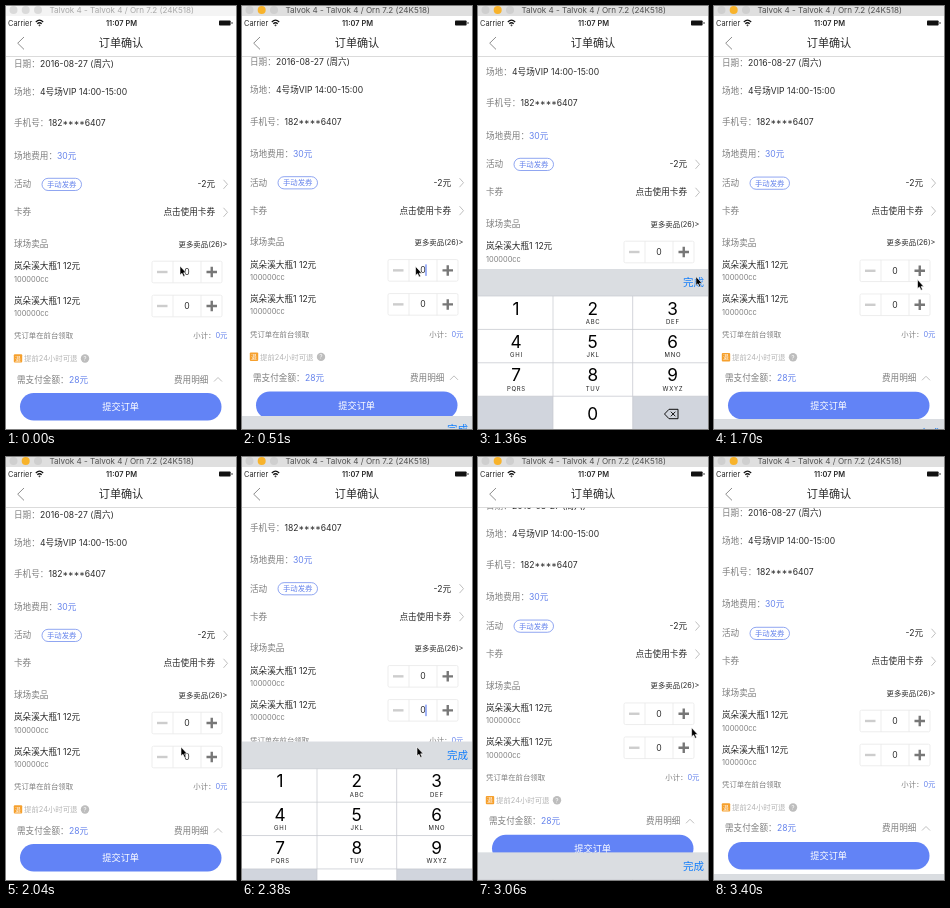
An HTML page for the animation above (3.57 s loop, 230 px wide and 423 px high).

```html
<!DOCTYPE html>
<html lang="zh">
<head>
<meta charset="utf-8">
<title>订单确认</title>
<style>
  html, body { margin: 0; width: 100%; height: 100%; overflow: hidden; background: #fff; }
  svg { display: block; font: 8.6px Inter, "Noto Sans CJK SC", "Noto Sans CJK", sans-serif; }
  text { fill: #2a2a2a; white-space: pre; }
  .label { fill: #7e7e7e; }
  .small { font-size: 7.4px; }
  .blue { fill: #6583ec; }
  .mid { text-anchor: middle; }
  .end { text-anchor: end; }
  .line { fill: none; stroke: #b8b8b8; stroke-width: .9; }
  .edge { stroke: #e9e9e9; stroke-width: .8; }
  #bar { fill: #f4f4f4; }
  #bar text { font-size: 8.1px; fill: #a8a8a8; }
  #bar circle { fill: #dadada; }
  #bar.active { fill: #dfdfdf; }
  #bar.active text { fill: #505050; }
  #bar.active circle { fill: #cfcfcf; }
  #bar.active .amber { fill: #f8b32b; }
  #keys .digit { font-size: 17.2px; fill: #000; }
  #keys .letters { font-size: 6px; letter-spacing: .7px; fill: #222; }
</style>
</head>
<body>
<svg width="230" height="423" viewBox="0 0 230 423">
  <defs>
    <path id="next" class="line" d="M217.5 -4.5l4 4.5-4 4.5"/>
    <g id="stepper">
      <rect class="edge" x="146" y="-10.8" width="70" height="21.6" rx="1.5" fill="#fff"/>
      <path class="edge" d="M167 -10.8v21.6M195 -10.8v21.6"/>
      <path d="M151 0h10.5" stroke="#cdcdcd" stroke-width="2.4"/>
      <path d="M200.5 0h10.5M205.75 -5.25v10.5" stroke="#777" stroke-width="2.4"/>
      <text class="mid" x="181" y="3.1">0</text>
    </g>
  </defs>
  <rect width="230" height="423" fill="#fff"/>

  <g id="page">
    <text class="label" x="8" y="61.1">日期：</text><text x="34" y="61.1">2016-08-27 (周六)</text>
    <text class="label" x="8" y="89.1">场地：</text><text x="34" y="89.1">4号场VIP 14:00-15:00</text>
    <text class="label" x="8" y="120.3">手机号：</text><text x="42.5" y="120.3">182****6407</text>
    <text class="label" x="8" y="152.5">场地费用：</text><text class="blue" x="51" y="152.5">30元</text>

    <text class="label" x="8" y="181.3">活动</text>
    <rect x="36" y="172.3" width="39.5" height="12.2" rx="6.1" fill="none" stroke="#7490ee" stroke-width=".8"/>
    <text class="small blue mid" x="55.7" y="181.1">手动发券</text>
    <text class="end" x="209" y="181.3">-2元</text><use href="#next" y="178.3"/>

    <text class="label" x="8" y="209.3">卡券</text>
    <text class="end" x="209" y="209.3">点击使用卡券</text><use href="#next" y="206.3"/>

    <text class="label" x="8" y="241">球场卖品</text>
    <text class="small end" x="221.5" y="240.6">更多卖品(26)&gt;</text>

    <text x="8" y="263.3">岚朵溪大瓶1 12元</text><text class="small label" x="8" y="275.7">100000cc</text>
    <use href="#stepper" y="266"/>
    <text x="8" y="297.7">岚朵溪大瓶1 12元</text><text class="small label" x="8" y="310.1">100000cc</text>
    <use href="#stepper" y="300"/>
    <rect id="caret" x="183.5" width="1" height="11.5" fill="#4468ee"/>

    <text class="small label" x="8" y="332.2">凭订单在前台领取</text>
    <text class="small label end" x="221.5" y="332.2">小计：<tspan class="blue">0元</tspan></text>

    <rect x="7.8" y="348.2" width="8.4" height="8.4" rx="1" fill="#f6a02d"/>
    <text class="mid" x="12" y="354.6" style="font-size:5.8px;fill:#fff">退</text>
    <text class="small" x="18" y="355.2" style="fill:#b4b4b4">提前24小时可退</text>
    <circle cx="79" cy="352.5" r="4.2" fill="#bdbdbd"/>
    <text class="mid" x="79" y="354.9" style="font-size:6.5px;fill:#fff">?</text>

    <text class="label" x="11" y="376.5">需支付金额：</text><text class="blue" x="63" y="376.5">28元</text>
    <text class="label" x="168" y="376.5">费用明细</text>
    <path class="line" d="M208 375.5l4-4 4 4"/>
    <rect x="14" y="387" width="201.5" height="27.6" rx="13.8" fill="#6283f6"/>
    <text class="mid" x="114.7" y="404.2" style="font-size:9.2px;fill:#fff">提交订单</text>
  </g>

  <rect y="10" width="230" height="40.5" fill="#fff"/>
  <path d="M0 50.5h230" stroke="#d2d2d2" stroke-width=".8"/>
  <text class="small" x="2" y="19.7">Carrier</text>
  <g fill="none" stroke="#111" stroke-width="1.2">
    <path d="M29.8 16q3.7-3.6 7.4 0M31.3 17.8q2.2-2.1 4.4 0"/>
    <circle cx="33.5" cy="19.3" r=".3"/>
  </g>
  <text class="small mid" x="115.5" y="19.7" font-weight="600">11:07 PM</text>
  <rect x="213" y="14.4" width="11.6" height="5.2" rx=".8" fill="#111"/>
  <path d="M226 16.2v1.6" stroke="#111"/>
  <path class="line" style="stroke:#808080" d="M18 31l-6.3 6.2 6.3 6.2"/>
  <text class="mid" x="115" y="41.1" style="font-size:11.1px">订单确认</text>

  <g id="bar">
    <rect width="230" height="10"/>
    <circle cx="7.5" cy="4" r="4"/><circle class="amber" cx="19.7" cy="4" r="4"/><circle cx="32" cy="4" r="4"/>
    <text class="mid" x="115.7" y="7.2">Talvok 4 - Talvok 4 / Orn 7.2 (24K518)</text>
  </g>

  <g id="keys">
    <rect y="263" width="230" height="160" fill="#d1d5dd"/>
    <rect y="263" width="230" height="27" fill="#dadde1"/>
    <text class="end" x="226" y="280.4" style="font-size:10.5px;font-weight:500;fill:#117dfb">完成</text>
  </g>

  <path id="arrow" d="M0 0v9l2-1.7 1.5 3.3 1.5-.7-1.4-3.1H6.2z" fill="#000" stroke="#fff" stroke-width=".6"/>
</svg>
<script>
  const LOOP = 3570, STEP = 170, RATE = 1.9 / STEP;
  const el = id => document.getElementById(id);
  const [page, keys, bar, caret, arrow] = ['page', 'keys', 'bar', 'caret', 'arrow'].map(el);

  // Keypad
  const letters = ['', 'ABC', 'DEF', 'GHI', 'JKL', 'MNO', 'PQRS', 'TUV', 'WXYZ'];
  const edges = [0, 75, 154.7, 230], centers = [38, 114.7, 194.5];
  const padTop = 290, rowH = 33.4;
  const label = (cls, x, y, s) => `<text class="mid ${cls}" x="${x}" y="${y}">${s}</text>`;
  const cell = (col, row) => `<rect x="${edges[col]}" y="${padTop + row * rowH}"
    width="${edges[col + 1] - edges[col]}" height="${rowH}" fill="#fff"/>`;
  let pad = '';
  letters.forEach((s, i) => {
    const col = i % 3, row = Math.floor(i / 3), y = padTop + row * rowH;
    pad += cell(col, row) + label('digit', centers[col], y + 18.6, i + 1)
      + label('letters', centers[col] + .4, y + 27.8, s);
  });
  pad += cell(1, 3) + label('digit', centers[1], 414.2, 0);
  let grid = edges.slice(1, 3).map(x => `M${x} ${padTop}v133`).join('');
  for (let r = 0; r < 4; r++) grid += `M0 ${padTop + r * rowH}h230`;
  pad += `<path d="${grid}" stroke="#c6c9ce" stroke-width=".7"/>
    <path d="M186.5 408l4.5-4.7h9v9.4h-9zM192.8 405.7l4.6 4.6m0-4.6l-4.6 4.6"
      fill="none" stroke="#111" stroke-width="1"/>`;
  keys.insertAdjacentHTML('beforeend', pad);

  // Keyboard moves: start time, spring phase at start, direction, page lift
  const moves = [
    { at: 0, phase: 9, up: false, lift: 0 },
    { at: 510, phase: .47, up: true, lift: 20 },
    { at: 1530, phase: 2.6, up: false, lift: 20 },
    { at: 2210, phase: 1.6, up: true, lift: 54 },
    { at: 3060, phase: 3.2, up: false, lift: 54, until: 3230 }
  ];
  // Pointer stops: time, x, y
  const pointer = [
    [0, 174, 260], [170, 173.6, 260.4], [850, 176, 261], [1020, 199, 267],
    [1190, 216.2, 269.5], [1360, 217.9, 270.5], [1700, 203.5, 273.6], [1870, 186, 286],
    [2040, 175, 290], [2550, 186, 285], [2720, 213.6, 270.7], [3230, -20, 0]
  ];
  // Visible caret: from, to, y
  const carets = [[510, 1190, 260], [2210, 2890, 294.3]];

  const latest = (list, test) => list.filter(test).pop();
  const spring = u => u > 7.8 ? 1 : 1 - (1 + u) * Math.exp(-u);
  const shift = (node, x, y) => node.setAttribute('transform', `translate(${x} ${y})`);

  function draw(ms) {
    const t = Math.floor(ms % LOOP / STEP) * STEP;
    const m = latest(moves, item => item.at <= t);
    const done = spring(m.phase + (Math.min(t, m.until || LOOP) - m.at) * RATE);
    const open = m.up ? done : 1 - done;
    shift(page, 0, -m.lift * open);
    shift(keys, 0, 160 * (1 - open));

    const [, x, y] = latest(pointer, item => item[0] <= t);
    shift(arrow, x, y);

    const c = carets.find(([from, to]) => t >= from && t < to);
    caret.setAttribute('visibility', c ? 'visible' : 'hidden');
    if (c) caret.setAttribute('y', c[2]);
    bar.classList.toggle('active', t >= 510);
  }

  const start = performance.now();
  function tick() {
    draw(performance.now() - start);
    requestAnimationFrame(tick);
  }
  tick();
</script>
</body>
</html>
```
